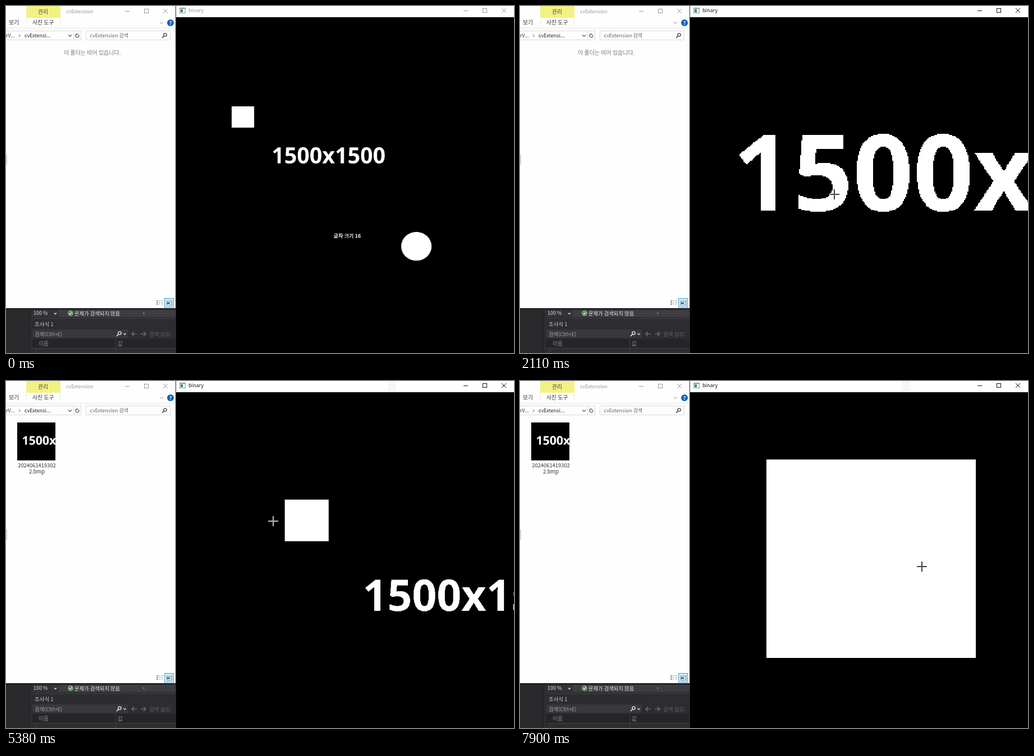
Animation, 905 px wide and 619 px high, one loop 8000 ms. Source, as an HTML page with a canvas:

```html
<!DOCTYPE html>
<html lang="ko">
<head>
<meta charset="utf-8">
<title>binary</title>
<style>
html, body { margin: 0; width: 100%; height: 100%; overflow: hidden; background: #000; }
canvas { display: block; }
</style>
</head>
<body>
<canvas id="stage" width="905" height="619"></canvas>
<script>
const LOOP = 8000;
const ctx = document.getElementById('stage').getContext('2d');
const UI = '"Noto Sans CJK KR", "Noto Sans CJK", sans-serif';
const VIEW = { x: 303, y: 19, w: 602, h: 600 };

// Pointer script: [start, end, 'move' | 'drag', x, y] or [start, end, 'zoom', notches]
const STEPS = [
  [130, 400, 'move', 524, 280.5],
  [430, 910, 'zoom', 5],
  [940, 1060, 'move', 478, 261],
  [1070, 1100, 'move', 485.3, 262],
  [1130, 1250, 'zoom', 2],
  [1300, 1750, 'drag', 551, 300],
  [1750, 2110, 'drag', 560, 336],
  [2110, 2200, 'drag', 560, 340],
  [2950, 2980, 'move', 560, 338],
  [3130, 3400, 'move', 627, 334],
  [3430, 3430, 'zoom', -1],
  [3790, 4090, 'move', 404, 169],
  [4240, 4420, 'zoom', -3],
  [4450, 4930, 'drag', 623, 311],
  [5110, 5350, 'move', 476, 250],
  [5400, 5490, 'move', 524, 253],
  [5500, 5740, 'zoom', 7],
  [5770, 5920, 'move', 654, 247],
  [5920, 6500, 'drag', 749, 339],
  [6530, 6700, 'drag', 712, 332.5],
  [6700, 6730, 'move', 719, 335],
  [7270, 7300, 'move', 722, 334.5],
  [7540, 7570, 'move', 728, 332],
  [7570, 7890, 'drag', 716, 331]
];
const SAVED = { s: 1.25 ** 7, x: -1878, y: -967.5 };

function stateAt(time) {
  const cursor = { x: 315, y: 290 };
  const view = { s: 1, x: 0, y: 0 };
  for (const [start, end, kind, a, b] of STEPS) {
    if (time < start) break;
    const k = end > start ? Math.min(1, (time - start) / (end - start)) : 1;
    if (kind === 'zoom') {
      const notches = 1 + Math.floor(k * (Math.abs(a) - 1));
      const f = 1.25 ** (Math.sign(a) * notches);
      view.s *= f;
      view.x = cursor.x + (view.x - cursor.x) * f;
      view.y = cursor.y + (view.y - cursor.y) * f;
      continue;
    }
    const dx = (a - cursor.x) * k, dy = (b - cursor.y) * k;
    cursor.x += dx;
    cursor.y += dy;
    if (kind === 'drag') {
      view.x += dx;
      view.y += dy;
    }
  }
  return { cursor, view };
}

function rect(c, x, y, w, h, color) {
  c.fillStyle = color;
  c.fillRect(x, y, w, h);
}

function frame(x, y, w, h, color) {
  ctx.strokeStyle = color;
  ctx.lineWidth = 1;
  ctx.strokeRect(x + .5, y + .5, w - 1, h - 1);
}

function line(color, width, ...points) {
  ctx.strokeStyle = color;
  ctx.lineWidth = width;
  ctx.beginPath();
  for (let i = 0; i < points.length; i += 2) ctx.lineTo(points[i], points[i + 1]);
  ctx.stroke();
}

function disc(c, x, y, rx, ry, color) {
  c.fillStyle = color;
  c.beginPath();
  c.ellipse(x, y, rx, ry, 0, 0, 7);
  c.fill();
}

function text(str, x, y, color, size = 9.8, align = 'left') {
  ctx.font = `${size}px ${UI}`;
  ctx.textAlign = align;
  ctx.fillStyle = color;
  ctx.fillText(str, x, y);
}

// The black and white picture shown in the viewer
function makePicture() {
  const canvas = document.createElement('canvas');
  canvas.width = 1505;
  canvas.height = 1500;
  const c = canvas.getContext('2d');
  c.scale(2.5, 2.5);
  c.translate(-VIEW.x, -VIEW.y);
  rect(c, VIEW.x, VIEW.y, VIEW.w, VIEW.h, '#000');
  rect(c, 402.3, 179, 39.8, 38.1, '#fff');
  disc(c, 731, 428.7, 27, 25.6, '#fff');
  c.font = '660 39.4px "Open Sans", "Noto Sans", sans-serif';
  c.fillText('1500x1500', 473.3, 280.5);
  c.font = `bold 9.2px ${UI}`;
  c.fillText('글자 크기 16', 583.5, 413.5);
  const data = c.getImageData(0, 0, canvas.width, canvas.height);
  const p = data.data;
  for (let i = 0; i < p.length; i += 4) p[i] = p[i + 1] = p[i + 2] = p[i] > 127 ? 255 : 0;
  c.putImageData(data, 0, 0);
  return canvas;
}
const picture = makePicture();

function drawPicture({ s, x, y }, smooth) {
  ctx.save();
  ctx.beginPath();
  ctx.rect(VIEW.x, VIEW.y, VIEW.w, VIEW.h);
  ctx.clip();
  rect(ctx, VIEW.x, VIEW.y, VIEW.w, VIEW.h, '#000');
  ctx.imageSmoothingEnabled = smooth;
  ctx.imageSmoothingQuality = 'high';
  ctx.drawImage(picture, VIEW.x * s + x, VIEW.y * s + y, VIEW.w * s, VIEW.h * s);
  ctx.restore();
}

function windowButtons(x, y, color) {
  line(color, 1, x - 4, y + .5, x + 4, y + .5);
  frame(x + 30, y - 4, 8, 8, color);
  line(color, 1, x + 64, y - 4, x + 72, y + 4);
  line(color, 1, x + 72, y - 4, x + 64, y + 4);
}

function magnifier(x, y, color) {
  ctx.strokeStyle = color;
  ctx.lineWidth = 1.4;
  ctx.beginPath();
  ctx.arc(x + 1.5, y - 1.5, 2.6, 0, 7);
  ctx.stroke();
  line(color, 1.6, x - .5, y + .5, x - 4, y + 4);
}

function drawExplorer(saved) {
  rect(ctx, 0, 0, 302, 539, '#fefefe');
  rect(ctx, 36, 0, 61, 21, '#f2f284');
  text('관리', 66, 14, '#444', 9.8, 'center');
  text('cvExtension', 107, 12.5, '#999', 8.8);
  windowButtons(216, 9, '#999');
  text('보기', 5, 33, '#333');
  text('사진 도구', 47, 33, '#333');
  rect(ctx, 36, 21, 1, 13, '#e6e6e6');
  rect(ctx, 96, 21, 1, 13, '#e6e6e6');
  rect(ctx, 0, 39, 302, 1, '#e6e6e6');
  line('#888', 1, 274, 28.5, 277, 31.5, 280, 28.5);
  disc(ctx, 293, 30, 6, 6, '#0f63b4');
  ctx.font = `bold 9px ${UI}`;
  ctx.textAlign = 'center';
  ctx.fillStyle = '#fff';
  ctx.fillText('?', 293, 33.5);

  frame(-2, 44, 136, 17, '#d9d9d9');
  rect(ctx, 120, 45, 1, 15, '#d9d9d9');
  text('rV...', 0, 56, '#333', 9);
  line('#555', 1, 23, 50.5, 25.5, 53, 23, 55.5);
  text('cvExtensi...', 33, 56, '#222', 9);
  line('#555', 1.2, 111, 51.5, 114, 54.5, 117, 51.5);
  ctx.strokeStyle = '#555';
  ctx.beginPath();
  ctx.arc(127, 53, 3, -.6, 4.6);
  ctx.stroke();
  line('#555', 1, 126, 48.5, 126, 51, 129, 50);
  frame(142, 44, 151, 17, '#d9d9d9');
  text('cvExtension 검색', 149.5, 56, '#666', 9);
  magnifier(282, 53, '#444');

  if (saved) {
    ctx.save();
    ctx.translate(20, 74);
    ctx.scale(68 / VIEW.w, 67.5 / VIEW.h);
    ctx.translate(-VIEW.x, -VIEW.y);
    drawPicture(SAVED, true);
    ctx.restore();
    text('2024061419302', 55, 154, '#333', 9.4, 'center');
    text('2.bmp', 55, 165, '#333', 9.4, 'center');
  } else {
    text('이 폴더는 비어 있습니다.', 103, 86.5, '#777', 10);
  }

  rect(ctx, 0, 265, 2, 18, '#d4d4d4');
  for (let y = 525; y < 534; y += 3) {
    rect(ctx, 268, y, 3, 2, '#999');
    rect(ctx, 272, y, 3, 1, '#aaa');
    rect(ctx, 276, y, 4, 1, '#aaa');
  }
  rect(ctx, 282, 521, 17, 17, '#cce8f7');
  frame(282, 521, 17, 17, '#49a5d6');
  frame(286, 526, 10, 8, '#888');
  rect(ctx, 287, 529, 5, 2, '#333');
}

function drawEditor() {
  rect(ctx, 0, 538, 303, 81, '#2d2d30');
  rect(ctx, 0, 539, 303, 2, '#1b1b1c');
  rect(ctx, 0, 541, 41, 78, '#2a2a2c');
  rect(ctx, 41, 541, 1, 78, '#1f1f20');
  rect(ctx, 47, 542, 47, 13, '#333337');
  rect(ctx, 94, 542, 208, 13, '#3e3e42');
  rect(ctx, 47, 557, 255, 1, '#3f3f46');
  text('100 %', 49, 551, '#ddd', 9);
  line('#ccc', 1.6, 86, 547.5, 88, 549.5, 90, 547.5);
  disc(ctx, 115, 548, 4.5, 4.5, '#e6f2e6');
  disc(ctx, 115, 548, 3.7, 3.7, '#388a34');
  line('#fff', 1.2, 113, 548, 114.5, 549.7, 117.3, 546.2);
  text('문제가 검색되지 않음', 122, 551.5, '#e8e8e8', 9.3);
  line('#777', 1.5, 246.5, 546, 244.5, 548, 246.5, 550);

  text('조사식 1', 51, 570.5, '#ccc', 9.5);
  rect(ctx, 47, 577, 170, 15, '#38383c');
  text('검색(Ctrl+E)', 51, 588.5, '#aaa', 9.3);
  magnifier(201, 585, '#eee');
  line('#ccc', 1.6, 209.5, 584, 211.5, 586, 213.5, 584);
  line('#777', 1.2, 233, 585, 224, 585);
  line('#777', 1.2, 228, 581, 224, 585, 228, 589);
  line('#777', 1.2, 240, 585, 249, 585);
  line('#777', 1.2, 245, 581, 249, 585, 245, 589);
  text('검색 심도:', 255, 588.5, '#666', 9.6);
  rect(ctx, 47, 594, 255, 16, '#252527');
  rect(ctx, 47, 610, 255, 1, '#3f3f46');
  rect(ctx, 195, 594, 1, 25, '#3f3f46');
  rect(ctx, 53, 610, 1, 9, '#3f3f46');
  text('이름', 58, 605.5, '#888');
  text('값', 199, 605.5, '#888');
}

function drawTitleBar(active, ghost) {
  rect(ctx, VIEW.x, 0, VIEW.w, 20, '#fff');
  if (ghost) rect(ctx, 680, 0, 15, 20, '#f7f7f7');
  rect(ctx, 309, 3, 11, 10, '#8a9aa0');
  rect(ctx, 310, 5, 9, 7, '#eef3f5');
  rect(ctx, 311, 6, 4, 5, '#3c7f86');
  text('binary', 325, 11, active ? '#111' : '#999', 9);
  windowButtons(819, 8, active ? '#111' : '#999');
}

function draw(time) {
  const { cursor, view } = stateAt(time);
  drawEditor();
  drawExplorer(time >= 4240);
  rect(ctx, 302, 0, 1, 619, '#2a2a2a');
  drawPicture(view, view.s < 2.5);
  drawTitleBar(time >= 1300, time >= 3130);
  if (time >= 3130 && time < 3610) rect(ctx, 303, 19, 5, 102, '#fdfdfd');
  if (time >= 130) {
    const x = Math.round(cursor.x), y = Math.round(cursor.y);
    ctx.globalCompositeOperation = 'difference';
    rect(ctx, x - 9, y - .75, 18, 1.5, '#fff');
    rect(ctx, x - .75, y - 9, 1.5, 8.25, '#fff');
    rect(ctx, x - .75, y + .75, 1.5, 8.25, '#fff');
    ctx.globalCompositeOperation = 'source-over';
  }
}

const began = performance.now();
function tick() {
  draw((performance.now() - began) % LOOP);
  requestAnimationFrame(tick);
}
tick();
</script>
</body>
</html>
```
